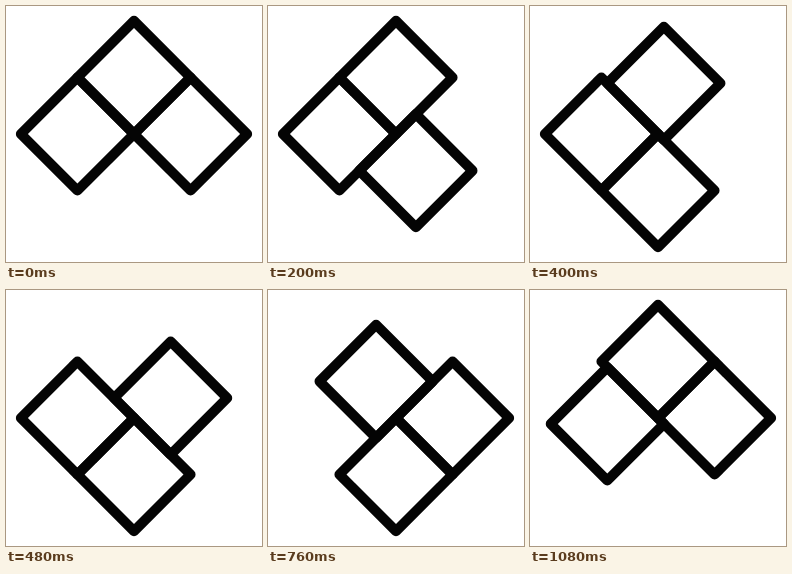
Animation, 256 px wide and 256 px high, one loop 1.12 s. Source, as an HTML page:

```html
<!DOCTYPE html>
<html lang="en">
<head>
<meta charset="utf-8">
<title>Sliding squares</title>
<style>
  html, body { margin: 0; height: 100%; overflow: hidden; background: #fff; }
  svg { display: block; width: 100%; height: 100%; }

  /* Smoothstep taken in five hard steps; the small negative delay keeps step edges crisp. */
  rect {
    --hop: linear(0 0% 20%, .104 20% 40%, .352 40% 60%, .648 60% 80%, .896 80% 100%, 1 100%);
    width: 80px;
    height: 80px;
    fill: none;
    stroke: #040404;
    stroke-width: 10;
    stroke-linejoin: round;
    animation: 1120ms var(--hop) -1ms infinite;
  }
  .left { animation-name: left-to-top; }
  .top { animation-name: top-to-right; }
  .right { animation-name: right-to-left; }

  /* Squares live on a 2 x 2 grid turned by 45 degrees.
     Each quarter of the loop: 80 ms rest, 200 ms slide. */
  @keyframes right-to-left {
    0%, 7.142857% { x: 0; y: -80px; }
    25%, 75%, 82.142857% { x: 0; y: 0; }
    25%, 57.142857% { x: 0; y: 0; }
    100% { x: -80px; y: 0; }
  }
  @keyframes top-to-right {
    0%, 32.142857% { x: -80px; y: -80px; }
    50%, 100% { x: 0; y: -80px; }
  }
  @keyframes left-to-top {
    0%, 57.142857% { x: -80px; y: 0; }
    75%, 100% { x: -80px; y: -80px; }
  }
</style>
</head>
<body>
<svg viewBox="0 0 256 256">
  <g transform="translate(128 128) rotate(45)">
    <rect class="left"/>
    <rect class="top"/>
    <rect class="right"/>
  </g>
</svg>
</body>
</html>
```
